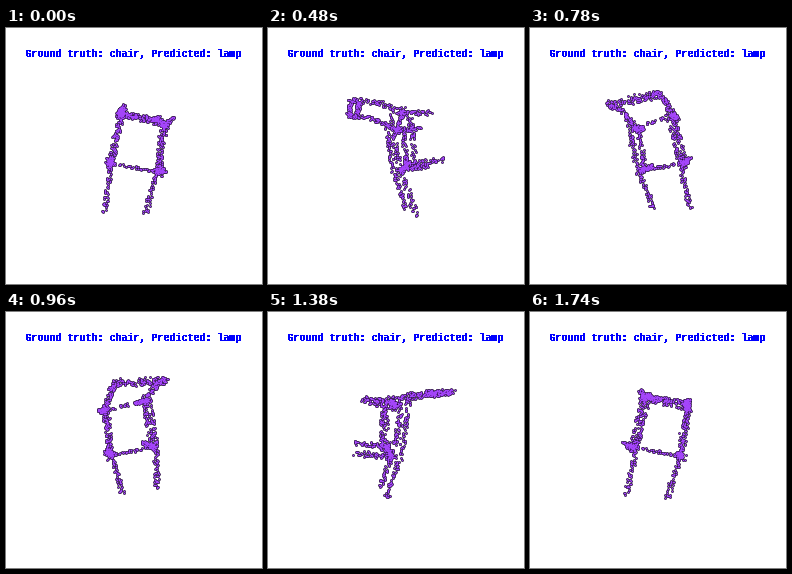
Recreate the animation shown at these times as a matplotlib script. Size 256 by 256 pixels, loop 1.8 s.

```python
import numpy as np
import matplotlib
import matplotlib.pyplot as plt
from matplotlib.animation import FuncAnimation

SIZE, DPI = 256, 64
FRAMES, STEP_MS = 30, 60
CAM = 221            # camera distance in pixels
PX = 72 / DPI        # one pixel in points
BLUE, PURPLE, DARK = "#0000ff", "#a445fa", "#1c0a2c"

matplotlib.rcParams["text.antialiased"] = False
rng = np.random.default_rng(7)


def vec(*p):
    return np.array(p, float)


def rod(a, b, density=1.15, spread=2.4, bow=0):
    """Points scattered along a rod that may bow upwards."""
    n = int(density * np.linalg.norm(b - a))
    t = rng.random((n, 1))
    lift = vec(0, -4 * bow, 0) * t * (1 - t)
    return a + (b - a) * t + lift + rng.uniform(-spread, spread, (n, 3))


def depth(p, dz):
    return p + vec(0, 0, dz)


def side(top, bottom, back, tip, end, foot):
    """One half of the chair; axes are width, down, depth."""
    rear = depth(bottom, -8)
    joints = [p + rng.normal(0, 2.4, (30, 3)) for p in (top, bottom)]
    return joints + [
        rod(top, back, 1.7, bow=4),
        rod(top, tip, 1.7),
        rod(bottom, end, 1.7),
        rod(depth(top, 7), depth(bottom, 7)),
        rod(depth(top, -12), rear),
        rod(rear, foot),
    ]


def build_chair():
    left = [vec(-13, -41, 4), vec(-23, 7, 8), vec(-17, -50, -44),
            vec(-9, -43, 32), vec(-20, 3, 43), vec(-28, 51, 14)]
    right = [vec(29, -30, 4), vec(23, 15, 7), vec(24, -44, -50),
             vec(32, -32, 32), vec(26, 11, 39), vec(10.5, 55, 11)]
    bars = [rod(left[0], right[0], 0.8, 1.4),
            rod(left[1], right[1], 0.9, 1.4)]
    bars += [rod(depth(left[2], dz), depth(right[2], dz), 1.3)
             for dz in (1, 9)]
    return np.vstack(side(*left) + side(*right) + bars)


chair = build_chair()


def project(k):
    ang = 2 * np.pi * k / FRAMES
    u, v, w = chair.T
    x = u * np.cos(ang) + w * np.sin(ang)
    near = w * np.cos(ang) - u * np.sin(ang)
    s = CAM / (CAM - near)
    return np.column_stack([SIZE / 2 + s * x, SIZE / 2 + s * v])


fig = plt.figure(figsize=(SIZE / DPI, SIZE / DPI), dpi=DPI, facecolor="white")
ax = fig.add_axes([0, 0, 1, 1])
ax.set(xlim=(0, SIZE), ylim=(SIZE, 0))
ax.axis("off")

# struck twice, one pixel apart, for a heavy bitmap look
for x in (19, 20):
    ax.text(x, 29, "Ground truth: chair, Predicted: lamp", color=BLUE,
            family="Liberation Mono", size=10 * PX, va="baseline")


def dots(width, color, z):
    return ax.scatter([], [], s=(width * PX) ** 2, c=color, marker="o",
                      linewidths=0, antialiased=False, zorder=z)


layers = [dots(2.8, DARK, 2), dots(1.6, PURPLE, 3)]


def draw(k):
    pts = project(k)
    for layer in layers:
        layer.set_offsets(pts)
    return layers


anim = FuncAnimation(fig, draw, frames=FRAMES, interval=STEP_MS,
                     repeat=True, repeat_delay=0)
plt.show()
```
